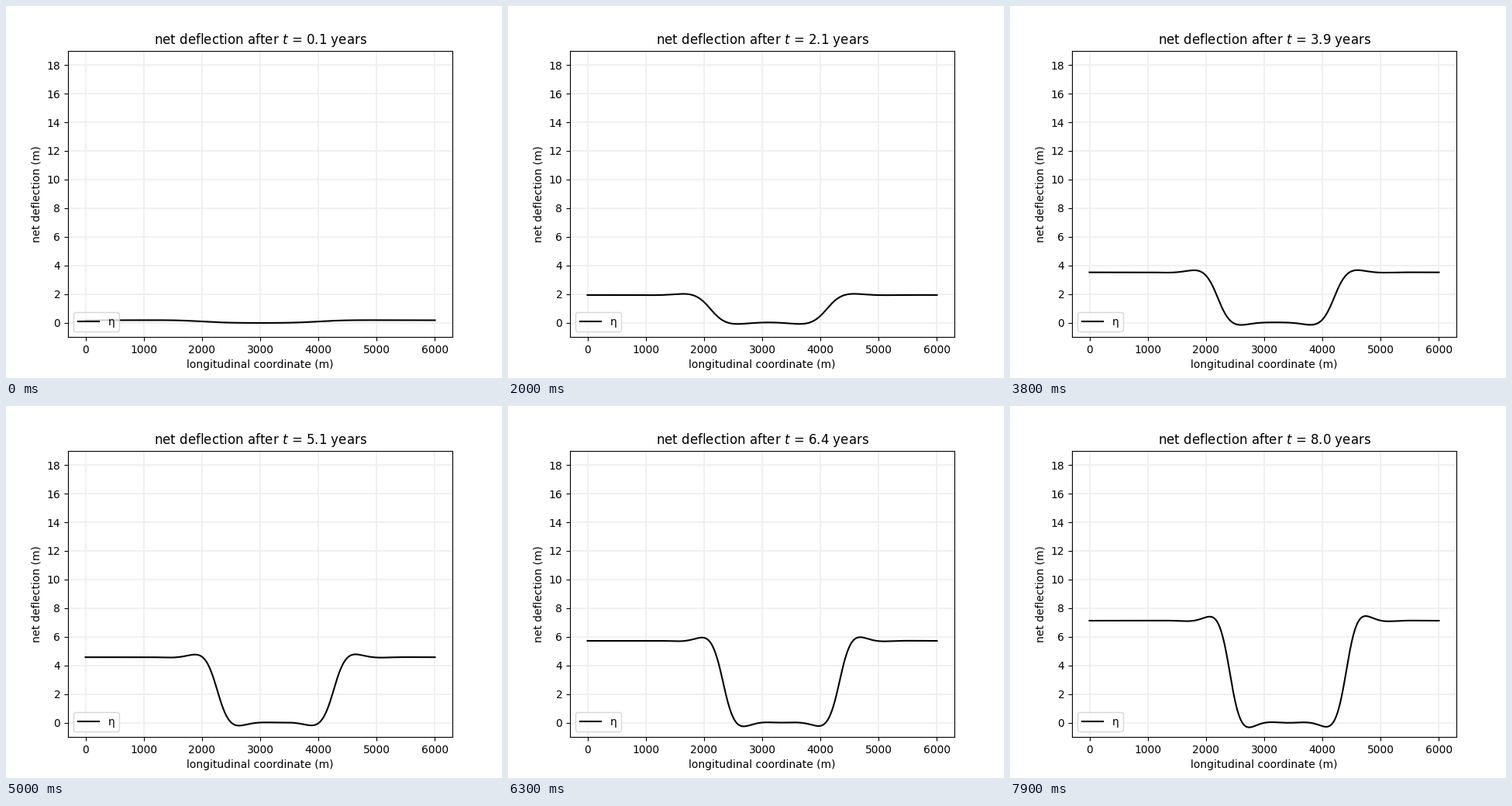
Animation of 640x480 px, one loop 8000 ms. Source, as a matplotlib script:

```python
import numpy as np
import matplotlib.pyplot as plt
from matplotlib.animation import FuncAnimation

FRAMES, INTERVAL = 80, 100
DT = 0.1                      # years per frame
RATE = 0.88                   # growth of the plateau, m per year
LEFT, RIGHT = 2000, 4000      # edges of the unloaded gap, m
V_LOAD, V_PLATE = 50, 52      # m per year
BETA = 6.1e8                  # viscous plate stiffness, m^4 years
PERIOD, MODES = 12000, 220

x = np.linspace(0, 6000, 601)
k = 2 * np.pi * np.arange(1, MODES + 1) / PERIOD
relax = BETA * k**4           # relaxation time of each mode
gap = (np.exp(-1j * k * LEFT) - np.exp(-1j * k * RIGHT)) / (1j * k)
waves = np.exp(1j * np.outer(x, k))


def deflection(t):
    """Viscous plate under a steadily growing load with a drifting gap."""
    slip = 1j * k * (V_PLATE - V_LOAD)
    c = 1 / relax + slip
    gain = (np.exp(slip * t) * (t / c - 1 / c**2)
            + np.exp(-t / relax) / c**2) / relax
    modes = gap * gain * np.exp(-1j * k * V_PLATE * t)
    mean = t * (RIGHT - LEFT) / PERIOD
    return RATE * (t - mean - 2 / PERIOD * (waves @ modes).real)


fig, ax = plt.subplots(figsize=(6.4, 4.8), dpi=100)
line, = ax.plot(x, deflection(2 * DT), color="black", lw=1.5, label="η")
ax.set_xlim(-300, 6300)
ax.set_ylim(-1, 19)
ax.set_xticks(range(0, 6001, 1000))
ax.set_yticks(range(0, 19, 2))
ax.set_axisbelow(True)
ax.grid(color="#eeeeee", lw=1.2)
ax.set_xlabel("longitudinal coordinate (m)")
ax.set_ylabel("net deflection (m)")
ax.legend(loc="lower left")
title = ax.set_title("")


def update(i):
    year = (i + 1) * DT
    line.set_ydata(deflection(year + DT))
    title.set_text(f"net deflection after $t$ = {year:.1f} years")
    return line, title


anim = FuncAnimation(fig, update, frames=FRAMES, interval=INTERVAL,
                     repeat=True, repeat_delay=0, blit=False)
plt.show()
```
